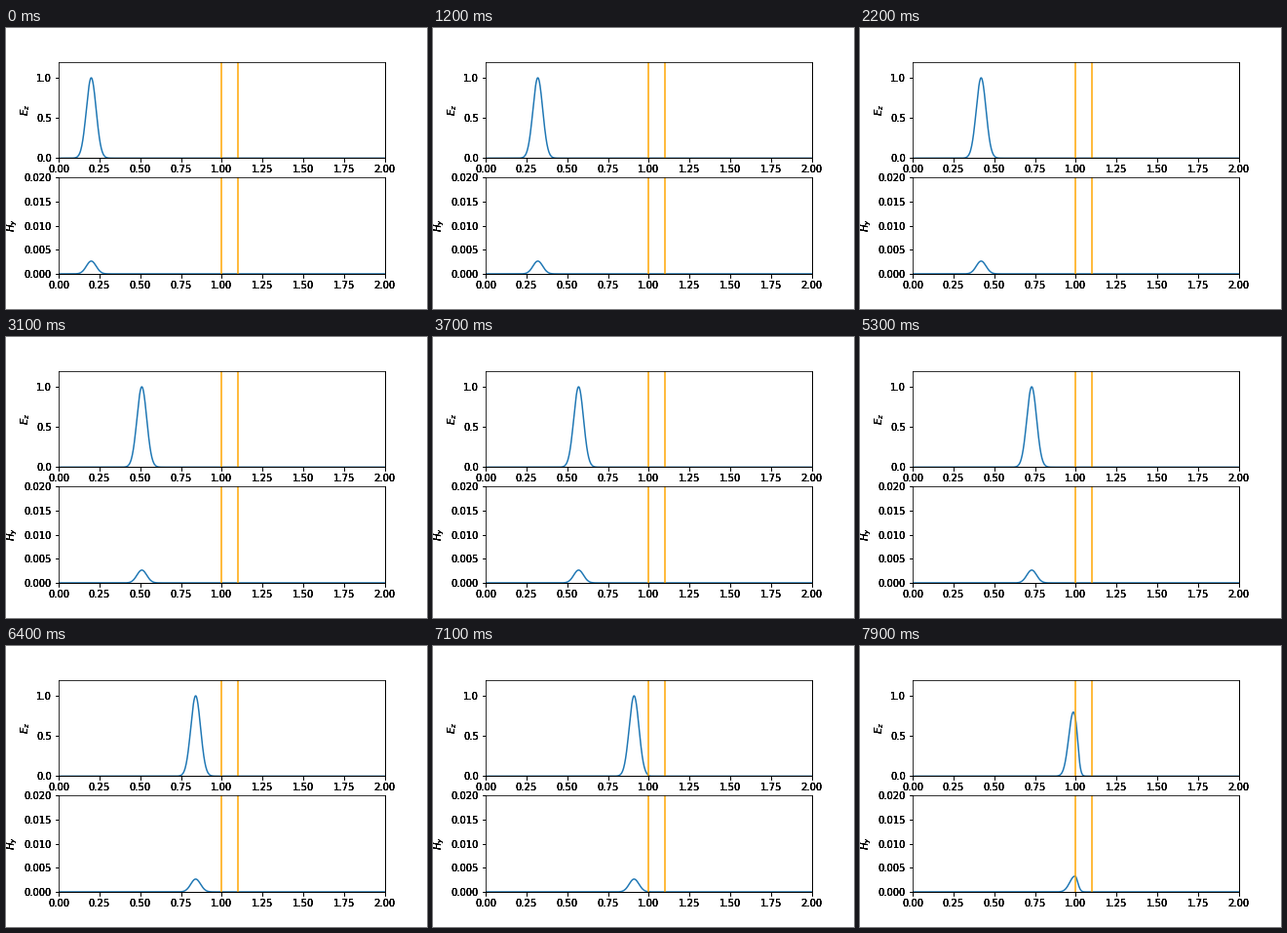
Recreate the animation shown at these times as a matplotlib script. Size 432 by 288 pixels, loop 8 s.

```python
import numpy as np
import matplotlib.pyplot as plt
from matplotlib.animation import FuncAnimation

FRAMES, INTERVAL = 80, 100
IMPEDANCE = 377.0
SIGMA = 0.03
SLAB = (1.0, 1.1)
N_SLAB = np.sqrt(3.0)
REFLECT = (1 - N_SLAB) / (1 + N_SLAB)
LAYERS = 4

plt.rcParams.update({"font.family": "DejaVu Sans", "font.size": 10})
fig = plt.figure(figsize=(6, 4), dpi=72, facecolor="white")
grid = fig.add_gridspec(2, 1, left=0.125, right=0.9, bottom=0.125, top=0.88, hspace=0.2)
x = np.linspace(0, 2, 1001)


def make_panel(row, label, top, ticks, fmt):
    ax = fig.add_subplot(grid[row])
    ax.set(xlim=(0, 2), ylim=(0, top), ylabel=label)
    ax.set_xticks(np.arange(0, 2.01, 0.25))
    ax.set_yticks(ticks)
    ax.xaxis.set_major_formatter("{x:.2f}")
    ax.yaxis.set_major_formatter(fmt)
    return ax


# Stacked panels darken the antialiased text and ticks outside the axes.
for _ in range(LAYERS):
    panels = [
        make_panel(0, "$E_z$", 1.2, [0, 0.5, 1], "{x:.1f}"),
        make_panel(1, "$H_y$", 0.02, np.linspace(0, 0.02, 5), "{x:.3f}"),
    ]

curves = []
for ax in panels:
    curves += ax.plot(x, 0 * x, color="C0", lw=1.5)
    for edge in SLAB:
        ax.axvline(edge, color="orange", lw=1.5)


def pulse(d):
    return np.exp(-d**2 / (2 * SIGMA**2))


def fields(center):
    """Pulse travelling right, partly reflected at the slab's front face."""
    face = SLAB[0]
    forward = pulse(x - center)
    back = REFLECT * pulse(2 * face - x - center)
    inside = (1 + REFLECT) * pulse(face + N_SLAB * (x - face) - center)
    e = np.where(x < face, forward + back, inside)
    h = np.where(x < face, forward - back, N_SLAB * inside) / IMPEDANCE
    return e, h


def update(i):
    for curve, values in zip(curves, fields(0.2 + 0.01 * i)):
        curve.set_ydata(values)
    return curves


anim = FuncAnimation(fig, update, frames=FRAMES, interval=INTERVAL,
                     repeat=True, repeat_delay=0, blit=False)
plt.show()
```
